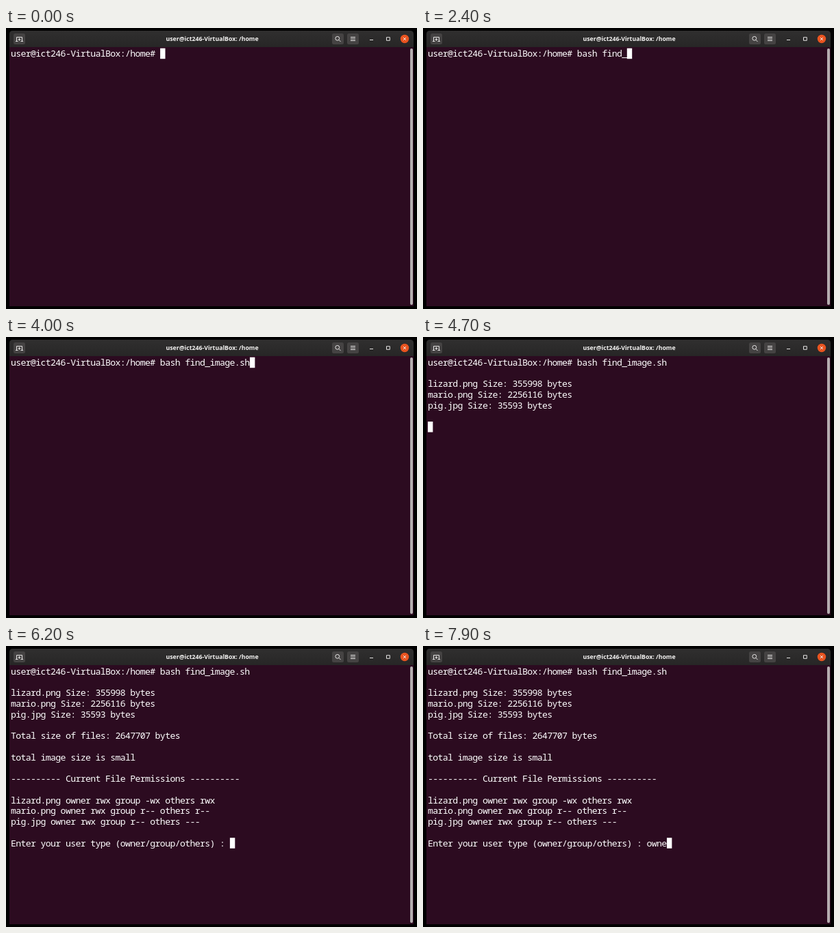
Write an HTML page that moves like this. It is 600 px wide and 412 px high and loops after 8000 ms.

```html
<!DOCTYPE html>
<html lang="en">
<head>
<meta charset="utf-8">
<title>Terminal</title>
<style>
  html, body { margin: 0; width: 100%; height: 100%; overflow: hidden; background: #000; }
  svg { display: block; }
  .title { font: 700 8.75px "Open Sans", "Noto Sans", sans-serif; fill: #f4f3f2; text-anchor: middle; }
  .row { font: 13.2px "Noto Sans Mono", "DejaVu Sans Mono", monospace; letter-spacing: -.65px; fill: #fff; white-space: pre; }
  .icon { fill: none; stroke: #e6e5e4; stroke-width: 1; }
</style>
</head>
<body>
<svg width="600" height="412" viewBox="0 0 600 412">
  <defs>
    <linearGradient id="bar" x2="0" y2="1">
      <stop stop-color="#302f2f"/><stop offset="1" stop-color="#272626"/>
    </linearGradient>
  </defs>
  <rect width="600" height="412"/>
  <path d="M5 28H595V408H5Z" fill="#2c0b20"/>
  <path d="M5 28V9Q5 4 10 4H590Q595 4 595 9V28Z" fill="url(#bar)"/>
  <rect x="590" y="30" width="4" height="376" rx="2" fill="#b5aeb0"/>
  <g fill="#454343">
    <rect x="11" y="8" width="17" height="16" rx="2.5"/>
    <rect x="476" y="8" width="17" height="16" rx="2.5"/>
    <rect x="498" y="8" width="17" height="16" rx="2.5"/>
  </g>
  <g class="icon">
    <path d="M15.5 19.5V13.5H23.5V19.5M14 19.5H17.5M21.5 19.5H25M19.5 14.8V18.8M17.5 16.8H21.5"/>
    <circle cx="483.8" cy="15.3" r="2.9"/>
    <path d="M486 17.5L488.6 20.1M503 13.5H510M503 16H510M503 18.5H510"/>
    <path d="M531 17.5H536M555.5 13.7H560.3V18.3H555.5Z"/>
  </g>
  <circle cx="582" cy="16" r="6.2" fill="#e95420"/>
  <path class="icon" d="M580 14L584 18M584 14L580 18"/>
  <text class="title" x="301" y="19">user@ict246-VirtualBox: /home</text>
  <g id="rows"></g>
  <rect id="cursor" width="7.4" height="15.5" fill="#fff"/>
</svg>
<script>
const LOOP = 8000, LEFT = 7, TOP = 29.7, CELL = 7.27, LINE = 15.72;
const prompt = "user@ict246-VirtualBox:/home# ";
const command = "bash find_image.sh";
const answer = "owne";
const output = [
  "",
  "lizard.png Size: 355998 bytes",
  "mario.png Size: 2256116 bytes",
  "pig.jpg Size: 35593 bytes",
  "",
  "Total size of files: 2647707 bytes",
  "",
  "total image size is small",
  "",
  "---------- Current File Permissions ----------",
  "",
  "lizard.png owner rwx group -wx others rwx",
  "mario.png owner rwx group r-- others r--",
  "pig.jpg owner rwx group r-- others ---",
  "",
  "Enter your user type (owner/group/others) : "
];

// [time, count] pairs: characters typed, output lines shown, answer typed
const typing = [[500, 2], [1000, 3], [1100, 4], [1200, 5], [1500, 7], [1900, 8], [2000, 9], [2400, 10],
  [2900, 12], [3100, 13], [3200, 14], [3600, 17], [4000, 18]];
const printing = [[4600, 1], [4700, 5], [4800, 11], [4900, 13], [5000, 16]];
const replying = [[7600, 1], [7700, 2], [7800, 3], [7900, 4]];
const hidden = [[5100, 5800], [6400, 7000]];

const countAt = (steps, t) => steps.reduce((n, [at, count]) => t >= at ? count : n, 0);

const cursor = document.getElementById("cursor");
const rows = Array.from({ length: output.length + 1 }, (_, i) => {
  const row = document.createElementNS("http://www.w3.org/2000/svg", "text");
  row.setAttribute("class", "row");
  row.setAttribute("x", LEFT);
  row.setAttribute("y", TOP + 12.3 + i * LINE);
  return document.getElementById("rows").appendChild(row);
});

function screenAt(t) {
  const shown = countAt(printing, t);
  const lines = [prompt + command.slice(0, countAt(typing, t)), ...output.slice(0, shown)];
  if (shown === output.length) lines[shown] += answer.slice(0, countAt(replying, t));
  else if (shown) lines.push("");
  return lines;
}

function draw(t) {
  const lines = screenAt(t), last = lines.length - 1;
  rows.forEach((row, i) => {
    const text = lines[i] || "";
    if (row.textContent !== text) row.textContent = text;
  });
  cursor.setAttribute("x", LEFT + lines[last].length * CELL);
  cursor.setAttribute("y", TOP + last * LINE);
  cursor.setAttribute("opacity", hidden.some(([from, to]) => t >= from && t < to) ? 0 : 1);
}

let start;
function tick(now) {
  start ??= now;
  draw((now - start) % LOOP);
  requestAnimationFrame(tick);
}
draw(0);
requestAnimationFrame(tick);
</script>
</body>
</html>
```
